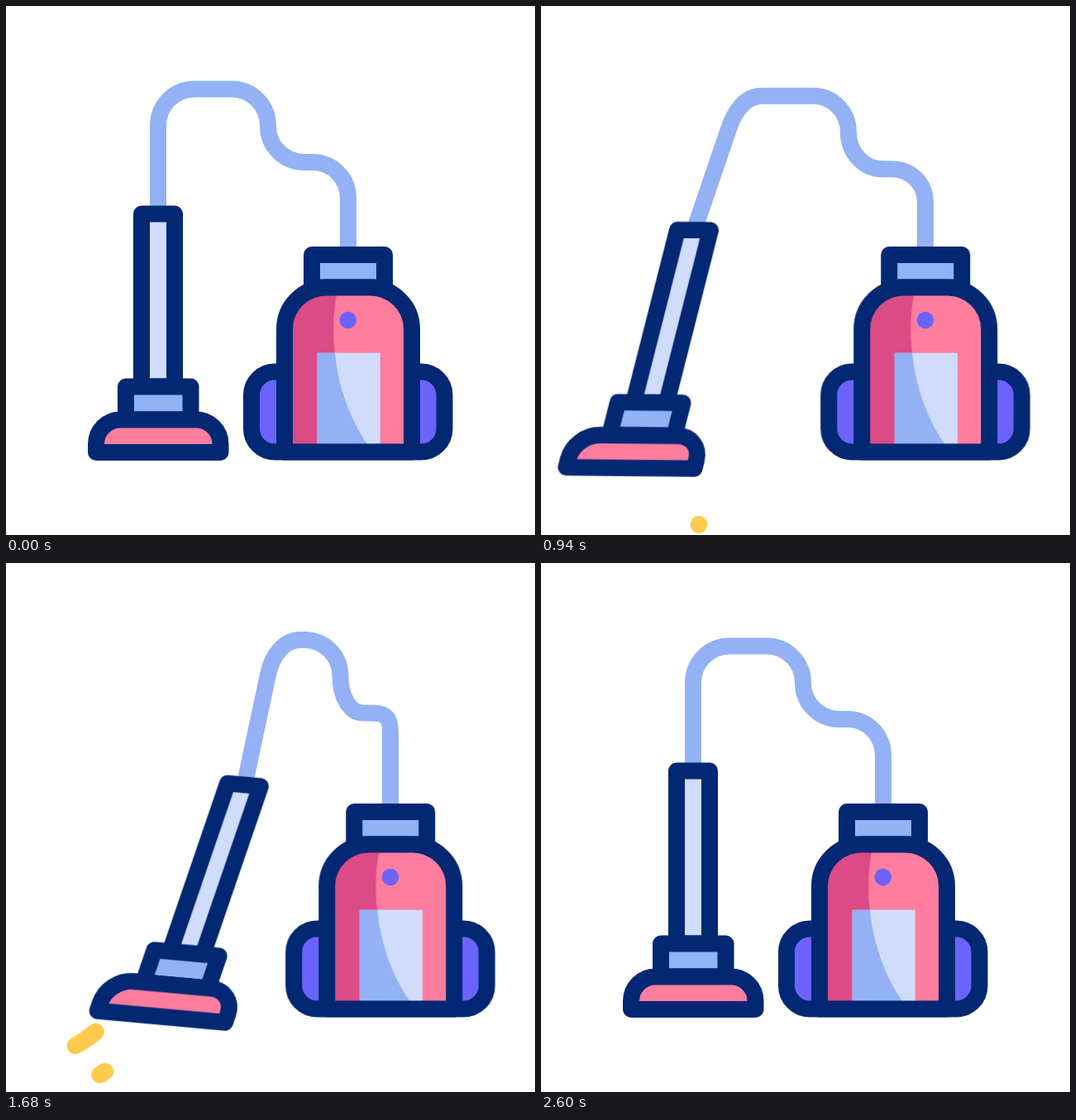
Recreate the animation shown at these times as an HTML page. Size 640 by 640 pixels, loop 3 s.

```html
<!DOCTYPE html>
<html lang="en">
<head>
<meta charset="utf-8">
<title>Vacuum cleaner</title>
<style>
  :root {
    --navy: #022873; --blue: #93b1f4; --pale: #d1dcfd; --pink: #ff7d9e;
    --rose: #db4b85; --violet: #6b63fb; --gold: #ffca50;
    --ease: cubic-bezier(.333, 0, .667, 1);
  }
  html, body { margin: 0; width: 100%; height: 100%; overflow: hidden; background: #fff; }
  svg { display: block; width: 100%; height: 100%; }

  .line { stroke: var(--navy); stroke-width: 20; stroke-linejoin: round; }
  .blue { fill: var(--blue); }
  .pale { fill: var(--pale); }
  .pink { fill: var(--pink); }
  .rose { fill: var(--rose); }
  .violet { fill: var(--violet); }
  .none { fill: none; }

  .body, .nozzle, .foot, .hose { animation: 3s var(--ease) infinite; }
  .body { animation-name: roll; }
  .nozzle { animation-name: sweep; transform-origin: 184px 262px; }
  .nozzle .line { vector-effect: non-scaling-stroke; }
  .foot { animation-name: stretch; transform-origin: 326px 0; }
  .hose { animation-name: bend; fill: none; stroke: var(--blue); stroke-width: 20; stroke-linejoin: round; }
  .lamp { animation: blink 3s step-end infinite; }
  .dust path {
    fill: none; stroke: var(--gold); stroke-width: 20.5; stroke-linecap: round;
    animation: suck 3s linear calc(var(--at) - 3s) infinite;
  }

  @keyframes roll {
    0%, 6.667%, 86.73%, 100% { transform: translateX(0); }
    26.667%, 69.5% { transform: translateX(51.2px); }
  }
  @keyframes sweep {
    0%, 6.667%, 86.73%, 100% { transform: translate(0, 0) rotate(0deg) skewX(0deg); }
    26.667% { transform: translate(-13.7px, 20px) rotate(0deg) skewX(-13.7deg); }
    50%, 69.5% { transform: translate(100.5px, 16.5px) rotate(5.2deg) skewX(-13.7deg); }
  }
  @keyframes stretch {
    0%, 6.667%, 86.73%, 100% { transform: scaleX(1); }
    26.667%, 69.5% { transform: scaleX(1.03); }
  }
  @keyframes bend {
    0%, 6.667%, 86.73%, 100% {
      d: path("M184 252 L184 145 C184 120.5 203.5 100.5 228 100.5 L273 100.5 C297.5 100.5 317 120.5 317 145 C317 169.5 336.5 189 361 189 L371 189 C395 189 414 208.5 414 233 L414 305");
    }
    26.667% {
      d: path("M173 272 L216.5 150 C225 127 238 110.5 258 110.5 L325.5 110.5 C349 110.5 368 130 368 154 C368 179 387 199 411 199 L422 199 C446 199 465 218 465 242 L465 305");
    }
    50%, 69.5% {
      d: path("M288.5 269 L317 135 C322 111 337 93 356 93 L361 93 C385 93 404.5 112 404.5 137 C404.5 160 415 181.5 432 181.5 L444 181.5 C460 181.5 465 188 465 205 L465 305");
    }
  }
  @keyframes blink {
    0%, 26.667%, 53.333%, 100% { fill: var(--violet); }
    13.333%, 40% { fill: var(--gold); }
  }
  /* the dash is the visible part between tail and head */
  @keyframes suck {
    0% { stroke-dasharray: 0 200; stroke-dashoffset: 0; opacity: 1; }
    3% { stroke-dasharray: 7 200; stroke-dashoffset: -8; }
    13% { stroke-dasharray: 31 200; stroke-dashoffset: -37; }
    17.67% { stroke-dasharray: 30 200; stroke-dashoffset: -62; }
    20.6% { stroke-dasharray: 0 200; stroke-dashoffset: -100; opacity: 1; }
    20.67%, 100% { stroke-dasharray: 0 200; stroke-dashoffset: -100; opacity: 0; }
  }
</style>
</head>
<body>
<svg viewBox="0 0 640 640">
  <path class="hose" d="M184 252 L184 145 C184 120.5 203.5 100.5 228 100.5 L273 100.5 C297.5 100.5 317 120.5 317 145 C317 169.5 336.5 189 361 189 L371 189 C395 189 414 208.5 414 233 L414 305"/>

  <g class="dust">
    <path style="--at: .935s" pathLength="100" d="M191 628.5 Q189 570 186 470"/>
    <path style="--at: 1.25s" pathLength="100" d="M236 611 Q230 575 225 455"/>
    <path style="--at: 1.29s" pathLength="100" d="M50 595 Q95 588 130 545"/>
    <path style="--at: 1.59s" pathLength="100" d="M105 622.5 Q142 612 168 535"/>
  </g>

  <g class="nozzle">
    <rect class="line pale" x="164" y="251.5" width="40" height="209"/>
    <rect class="line blue" x="145" y="460.5" width="78.5" height="40"/>
    <path class="line pink foot" d="M109 540 V530 A29.5 29.5 0 0 1 138.5 500.5 H230 A29.5 29.5 0 0 1 259.5 530 V540 Z"/>
  </g>

  <g class="body">
    <rect class="line violet" x="297" y="442.5" width="233.5" height="97" rx="28"/>
    <rect class="line blue" x="370" y="301" width="88" height="39.5"/>
    <path class="pink" d="M337 539.5 V391 A50.5 50.5 0 0 1 387.5 340.5 H440.5 A50.5 50.5 0 0 1 491 391 V539.5 Z"/>
    <path class="rose" d="M337 535 V391 A50.5 50.5 0 0 1 387.5 340.5 H402 L400 350 C391 395 396 468 437 530 L440 535 Z"/>
    <rect class="pale" x="376.7" y="419.7" width="76" height="115"/>
    <path class="blue" d="M376.7 419.7 H398 C401.5 457 414 496 437 530 L440 535 H376.7 Z"/>
    <circle class="lamp violet" cx="413.7" cy="380" r="10.3"/>
    <path class="line none" d="M337 539.5 V391 A50.5 50.5 0 0 1 387.5 340.5 H440.5 A50.5 50.5 0 0 1 491 391 V539.5 Z"/>
  </g>
</svg>
</body>
</html>
```
